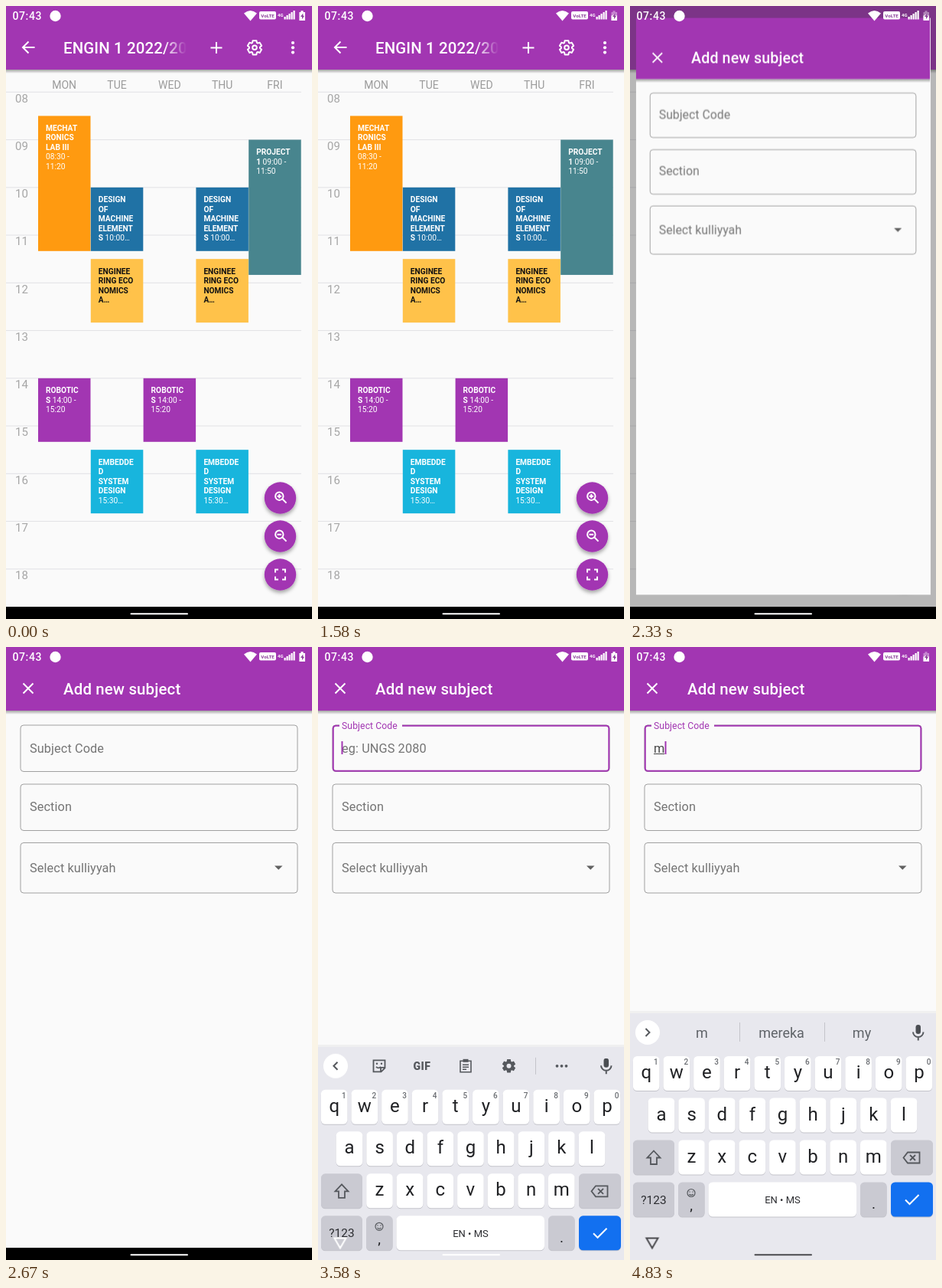
An HTML page for the animation above (5010 ms loop, 400 by 800 pixels).

```html
<!DOCTYPE html>
<html lang="en">
<head>
<meta charset="utf-8">
<title>Timetable: add a subject</title>
<style>
  html, body { margin: 0; width: 100%; height: 100%; overflow: hidden; background: #000; }
  svg { display: block; width: 100%; height: 100%; font-family: Roboto, sans-serif; }
  .title { font-size: 20.4px; font-weight: 500; letter-spacing: .15px; }
  .day { font-size: 14px; fill: #9b9b9b; text-anchor: middle; }
  .hour { font-size: 15px; fill: #a6a6a6; text-anchor: middle; }
  .lesson { font-size: 10.2px; }
  .bold { font-weight: 700; }
  .field { font-size: 16.3px; letter-spacing: .1px; fill: #757575; }
  .box { fill: none; stroke: #a0a0a0; }
  .key { font-size: 24px; fill: #202124; text-anchor: middle; }
  .sup { font-size: 10px; font-weight: 500; fill: #6a6d72; text-anchor: middle; }
  .small { font-size: 13px; fill: #2b2c30; text-anchor: middle; }
  .word { font-size: 18px; fill: #5f6368; text-anchor: middle; }
  .line { fill: none; stroke: #fff; stroke-width: 2; }
  .grey { fill: none; stroke: #55585d; stroke-width: 2; }

  .anim { animation: 5010ms linear infinite; }
  #ripple { animation-name: ripple; transform-origin: 275px 54px; }
  #scrim { animation-name: scrim; }
  #form { animation-name: form; transform-origin: 200px 392px; }
  #focus { animation-name: focus; }
  #gap { animation-name: gap; transform-origin: 69px 102px; }
  #label { animation-name: label; }
  #hint { animation-name: hint; }
  #cursor { animation-name: cursor; animation-timing-function: step-end; }
  #keyboard { animation-name: keyboard; }
  #back { animation-name: back; }
  #pill { animation-name: pill; }
  #popup { animation-name: popup; animation-timing-function: step-end; }
  #typed { animation-name: typed; animation-timing-function: step-end; }
  #tools { animation-name: tools; animation-timing-function: step-end; }
  #words { animation-name: words; animation-timing-function: step-end; }
  #charge { animation-name: charge; animation-timing-function: step-end; transform-origin: 387px 19px; }

  @keyframes ripple {
    0%, 36.4% { opacity: 0; transform: scale(.3); }
    38.2% { opacity: .18; }
    43.3% { opacity: .18; transform: scale(1); }
    46.5%, 100% { opacity: 0; transform: scale(1); }
  }
  @keyframes scrim {
    0%, 45.2% { opacity: 0; }
    46.51% { opacity: .33; }
    48.3%, 100% { opacity: .6; }
  }
  @keyframes form {
    0%, 44.71% { opacity: 0; transform: scale(.85); }
    45.3% { opacity: 0; }
    46.2% { opacity: 1; }
    46.51% { opacity: 1; transform: scale(.96); }
    48.3% { transform: scale(.988); }
    50% { transform: scale(.997); }
    53.3%, 100% { opacity: 1; transform: none; }
  }
  @keyframes focus {
    0%, 58.28% { opacity: 0; }
    62.28%, 100% { opacity: 1; }
  }
  @keyframes gap {
    0%, 58.28% { transform: scaleX(0); animation-timing-function: cubic-bezier(.4, 0, .2, 1); }
    62.28%, 100% { transform: scaleX(1); }
  }
  @keyframes label {
    0%, 58.28% { transform: translate(31px, 137.5px); fill: #757575; animation-timing-function: cubic-bezier(.4, 0, .2, 1); }
    62.28%, 100% { transform: translate(31px, 106.7px) scale(.75); fill: #a236b2; }
  }
  @keyframes hint {
    0%, 60% { opacity: 0; }
    63%, 91.4% { opacity: 1; }
    91.42%, 100% { opacity: 0; }
  }
  @keyframes cursor {
    0% { opacity: 0; transform: none; }
    61% { opacity: 1; transform: none; }
    78.24% { opacity: 0; transform: none; }
    88.22% { opacity: 1; transform: none; }
    91.42%, 100% { opacity: 1; transform: translateX(15px); }
  }
  @keyframes keyboard {
    0%, 68.26% { transform: translateY(324px); animation-timing-function: cubic-bezier(0, 0, .2, 1); }
    74.25%, 100% { transform: none; }
  }
  @keyframes back {
    0%, 69.5% { opacity: 0; stroke: #fff; }
    69.8% { opacity: 1; }
    74.8% { opacity: 1; stroke: #fff; }
    85.8%, 100% { opacity: 1; stroke: #4a4a4e; }
  }
  @keyframes pill {
    0%, 74.8% { fill: #fff; }
    85.8%, 100% { fill: #4a4a4e; }
  }
  @keyframes popup {
    0% { opacity: 0; }
    88.22% { opacity: 1; }
    92.8%, 100% { opacity: 0; }
  }
  @keyframes typed { 0% { opacity: 0; } 91.42%, 100% { opacity: 1; } }
  @keyframes words { 0% { opacity: 0; } 93.21%, 100% { opacity: 1; } }
  @keyframes tools { 0% { opacity: 1; } 93.21%, 100% { opacity: 0; } }
  @keyframes charge {
    0% { transform: none; }
    30% { transform: scaleY(.6); }
    50% { transform: none; }
    88%, 100% { transform: scaleY(.6); }
  }
</style>
</head>
<body>
<svg viewBox="0 0 400 800" xmlns="http://www.w3.org/2000/svg">
  <defs>
    <linearGradient id="fade" gradientUnits="userSpaceOnUse" x1="206" x2="236" y1="0" y2="0">
      <stop offset="0" stop-color="#fff"/><stop offset="1" stop-color="#fff" stop-opacity="0"/>
    </linearGradient>
    <linearGradient id="shade" x2="0" y2="1">
      <stop offset="0" stop-opacity=".35"/><stop offset="1" stop-opacity="0"/>
    </linearGradient>
    <filter id="drop" x="-30%" y="-30%" width="160%" height="170%">
      <feDropShadow dx="0" dy="3" stdDeviation="2.5" flood-opacity=".35"/>
    </filter>
    <g id="bar">
      <rect width="400" height="784" fill="#fafafa"/>
      <rect y="83" width="400" height="5" fill="url(#shade)"/>
      <rect width="400" height="83" fill="#a236b2"/>
    </g>
  </defs>

  <g id="table">
    <use href="#bar"/>
    <path class="line" d="M37.500 54H22M29.500 46.500L22 54l7.500 7.500M275 47v15M267.500 54.500h15"/>
    <text class="title" x="75" y="61.500" fill="url(#fade)">ENGIN 1 2022/2023</text>
    <circle id="ripple" class="anim" cx="275" cy="54" r="24" fill="#fff"/>
    <g fill="#fff"><circle cx="375" cy="48" r="2.100"/><circle cx="375" cy="54.300" r="2.100"/><circle cx="375" cy="60.600" r="2.100"/></g>
    <g id="grid"></g>
    <g id="fabs"></g>
  </g>

  <rect id="scrim" class="anim" width="400" height="784" fill="#323232"/>

  <g id="form" class="anim">
    <use href="#bar"/>
    <path class="line" d="M22.500 47.500l13 13M35.500 47.500l-13 13"/>
    <text class="title" x="75" y="61.500" fill="#fff">Add new subject</text>
    <rect class="box" x="19" y="102" width="362" height="60.500" rx="4"/>
    <rect class="box" x="19" y="179" width="362" height="60.500" rx="4"/>
    <rect class="box" x="19" y="255.500" width="362" height="65.500" rx="4"/>
    <rect id="focus" class="box anim" x="19.800" y="102.800" width="360.500" height="59" rx="3.500" style="stroke:#a236b2;stroke-width:2"/>
    <rect id="gap" class="anim" x="28" y="100" width="82" height="5" fill="#fafafa"/>
    <text id="label" class="field anim">Subject Code</text>
    <text id="hint" class="field anim" x="31" y="137.500">eg: UNGS 2080</text>
    <g id="typed" class="anim">
      <text class="field" x="31" y="137.500" style="fill:#444">m</text>
      <path d="M31 139.500h14" stroke="#444"/>
    </g>
    <rect id="cursor" class="anim" x="30.500" y="123" width="2" height="17" fill="#a236b2"/>
    <text class="field" x="31" y="214">Section</text>
    <text class="field" x="31" y="293.500">Select kulliyyah</text>
    <path d="M351 285.500h10.500l-5.250 5.300z" fill="#616161"/>
  </g>

  <rect y="784" width="400" height="16"/>

  <g id="keyboard" class="anim">
    <rect y="478" width="400" height="322" fill="#e8e8ee"/>
    <rect y="475" width="400" height="3" fill="#000" opacity=".04"/>
    <circle cx="23" cy="503" r="16" fill="#fff"/>
    <g id="tools" class="anim">
      <path class="grey" d="M25.500 498l-5 5 5 5"/>
      <path class="grey" d="M72.500 495.500h15v10l-5 5h-10zM87 505h-5v5M76 504q3 3 6 0" style="stroke-width:1.800"/>
      <g fill="#55585d"><circle cx="77" cy="500" r="1.200"/><circle cx="83" cy="500" r="1.200"/></g>
      <text x="136" y="508" text-anchor="middle" font-size="14" font-weight="900" letter-spacing=".6" fill="#55585d">GIF</text>
      <path class="grey" d="M186 496.500h14v14.500h-14zM189 501.500h8M189 504.500h8M189 507.500h5" style="stroke-width:1.600"/>
      <path d="M189.500 494h7v4h-7z" fill="#55585d"/>
      <g id="cog"></g>
      <path d="M284.500 492v22" stroke="#c4c4ca"/>
      <g fill="#55585d"><circle cx="312.500" cy="503" r="1.900"/><circle cx="318.500" cy="503" r="1.900"/><circle cx="324.500" cy="503" r="1.900"/></g>
    </g>
    <g id="words" class="anim">
      <path class="grey" d="M20.500 498l5 5-5 5"/>
      <text class="word" x="94" y="510">m</text>
      <text class="word" x="198" y="510">mereka</text>
      <text class="word" x="303" y="510">my</text>
      <path d="M143.500 490v25M254.500 490v25" stroke="#c4c4ca"/>
    </g>
    <rect x="373.500" y="493" width="6.500" height="12" rx="3.250" fill="#4a4d52"/>
    <path class="grey" d="M370 502.500a6.750 6.500 0 0 0 13.500 0M376.750 509v4.500"/>
    <g id="keys"></g>
    <g id="popup" class="anim">
      <rect x="299" y="584" width="38" height="105" rx="6" fill="#fff" filter="url(#drop)"/>
      <text class="key" x="318" y="622" style="font-size:28px">m</text>
    </g>
  </g>

  <path id="back" class="anim" d="M22 771.500h15l-7.500 13z" fill="none" stroke-width="2" transform="translate(-.5 0)"/>
  <rect id="pill" class="anim" x="162.500" y="792.300" width="75.500" height="2" rx="1"/>

  <g fill="#fff">
    <text x="8.500" y="17.800" font-size="14" font-weight="500" letter-spacing=".6">07:43</text>
    <circle cx="64.500" cy="13" r="7.200"/>
    <path d="M311 9.500q8.500-7 17 0L319.500 19.500z"/>
    <rect x="331" y="7" width="22" height="10.500" rx="2"/>
    <text x="342" y="14.500" font-size="6.200" font-weight="700" text-anchor="middle" fill="#8b3f99">VoLTE</text>
    <text x="355" y="14" font-size="6" font-weight="700">4G</text>
    <g id="bars"></g>
    <path d="M383.500 8h2v-1.800h3V8h2.500v11h-7.500z" opacity=".4"/>
    <path id="charge" class="anim" d="M383.500 8h2v-1.800h3V8h2.500v11h-7.500z"/>
    <path d="M388.300 9.500l-3.300 4.500h2v3.300l3-4.600h-1.700z" fill="#8b3f99"/>
  </g>
</svg>
<script>
const put = (id, html) => document.getElementById(id).insertAdjacentHTML('beforeend', html);
const range = n => [...Array(n).keys()];

// Timetable: 62.25px per hour, 68.8px per day.
const hourY = h => 112.3 + 62.25 * (h - 8);
const dayX = d => 42 + 68.8 * d;

function lesson(day, from, to, fill, lines, ink = '#fff') {
  const x = dayX(day), y = hourY(from);
  let bold = true, html = `<rect x="${x}" y="${y}" width="68.5" height="${hourY(to) - y}" fill="${fill}"/>`;
  lines.split('|').forEach((line, i) => {
    // A star ends the bold name; the time follows in regular weight.
    const [name, time] = bold ? line.split('*') : ['', line];
    if (time !== undefined) bold = false;
    html += `<text class="lesson" x="${x + 10}" y="${y + 19.6 + i * 12.45}" fill="${ink}">` +
      `<tspan class="bold">${name}</tspan>${time ? `<tspan>${time}</tspan>` : ''}</text>`;
  });
  return html;
}

let grid = range(11).map(i => {
  const y = hourY(8 + i);
  return `<path d="M0 ${y}H386" stroke="#e2e2e5"/>` +
    `<text class="hour" x="20.5" y="${y + 13.3}">${String(8 + i).padStart(2, '0')}</text>`;
}).join('');
['MON', 'TUE', 'WED', 'THU', 'FRI'].forEach((name, d) => {
  grid += `<text class="day" x="${dayX(d) + 34.2}" y="108">${name}</text>`;
});
const third = 1 / 3, late = 5 / 6;
grid += lesson(0, 8.5, 11 + third, '#ff9a10', 'MECHAT|RONICS|LAB III*|08:30 -|11:20');
grid += lesson(4, 9, 11 + late, '#48858e', 'PROJECT|1 *09:00 -|11:50');
for (const d of [1, 3]) {
  grid += lesson(d, 10, 11 + third, '#2072a5', 'DESIGN|OF|MACHINE|ELEMENT|S *10:00…');
  grid += lesson(d, 11.5, 12 + late, '#ffc24a', 'ENGINEE|RING ECO|NOMICS|A…', '#111');
  grid += lesson(d, 15.5, 16 + late, '#18b5dd', 'EMBEDDE|D|SYSTEM|DESIGN*|15:30…');
}
for (const d of [0, 2]) grid += lesson(d, 14, 15 + third, '#a236b2', 'ROBOTIC|S *14:00 -|15:20');
put('grid', grid);

// Floating buttons
const lens = 'M3.2 1.8L8 6.6M4-2.3a5.2 5.2 0 1 1-10.400 0a5.2 5.2 0 1 1 10.400 0M-4-2.300h5.600';
[lens + 'M-1.200-5.100v5.600', lens, 'M-6.500-2.500v-4h4M2.500-6.500h4v4M6.500 2.500v4h-4M-2.500 6.500h-4v-4'].forEach((d, i) =>
  put('fabs', `<g transform="translate(358.5 ${642 + 50 * i})"><circle r="20.7" fill="#a236b2" filter="url(#drop)"/>` +
    `<path class="line" d="${d}"/></g>`));

// Six-toothed gear
function gear(cx, cy, outer, inner) {
  const at = (r, deg) => {
    const a = deg * Math.PI / 180;
    return `${(cx + r * Math.cos(a)).toFixed(2)} ${(cy + r * Math.sin(a)).toFixed(2)}`;
  };
  return 'M' + range(6).map(i => {
    const a = 30 + i * 60;
    return [at(inner, a - 25), at(outer, a - 15), at(outer, a + 15), at(inner, a + 25)].join('L');
  }).join('L') + 'z';
}
put('table', `<path class="line" stroke-linejoin="round" d="${gear(325, 54.3, 9.4, 7)}"/>` +
  '<circle class="line" cx="325" cy="54.3" r="2.8"/>');
put('cog', `<path fill="#55585d" d="${gear(249.5, 503, 9, 6.6)}"/><circle cx="249.5" cy="503" r="3" fill="#e8e8ee"/>`);

// Keyboard
const cap = (x, y, w, fill = '#fff') =>
  `<rect x="${x}" y="${y + 1}" width="${w}" height="45" rx="5.5" fill="#c3c3ca"/>` +
  `<rect x="${x}" y="${y}" width="${w}" height="45" rx="5.5" fill="${fill}"/>`;
const dim = '#cacad2';
let keys = '';
[['qwertyuiop', 21.2, 534], ['asdfghjkl', 41, 588.5], ['zxcvbnm', 80.5, 643.5]].forEach(([row, x0, y], r) =>
  [...row].forEach((ch, i) => {
    const x = x0 + 39.63 * i;
    keys += cap(x - 17.3, y, 34.6) + `<text class="key" x="${x}" y="${y + 29}">${ch}</text>`;
    if (!r) keys += `<text class="sup" x="${x + 12.6}" y="${y + 11}">${(i + 1) % 10}</text>`;
  }));
keys += cap(4, 643.5, 54, dim) + cap(341, 643.5, 55, dim) + cap(4, 698.5, 54, dim) + cap(63, 698.5, 34.6, dim) +
  cap(102.5, 698.5, 193.5) + cap(301, 698.5, 34.6, dim) + cap(341, 698.5, 55, '#1270f0');
keys += '<path class="grey" d="M31 657.500l-8.500 9h4.500v8.500h8v-8.500h4.500z" style="stroke-width:1.800"/>' +
  '<path class="grey" d="M363 659.500h15.500v14h-15.500l-5.500-7zM366 663l7 7M373 663l-7 7" style="stroke-width:1.800"/>' +
  '<text class="small" x="31" y="726.500" style="font-size:15.500px">?123</text>' +
  '<circle class="grey" cx="80" cy="712.500" r="5" style="stroke-width:1.200"/>' +
  '<path class="grey" d="M77.500 714q2.500 2.800 5 0M78 710.500v1.300M82 710.500v1.300" style="stroke-width:1.200"/>' +
  '<text class="key" x="80" y="735" style="font-size:19px">,</text>' +
  '<text class="small" x="199.500" y="726">EN • MS</text>' +
  '<text class="key" x="318.500" y="733" style="font-size:19px">.</text>' +
  '<path class="line" d="M360 721.500l5.500 5.500 12-12"/>';
put('keys', keys);

put('bars', range(5).map(i => `<rect x="${363.5 + 3 * i}" y="${14 - 2 * i}" width="2.2" height="${3.5 + 2 * i}"/>`).join(''));
</script>
</body>
</html>
```
